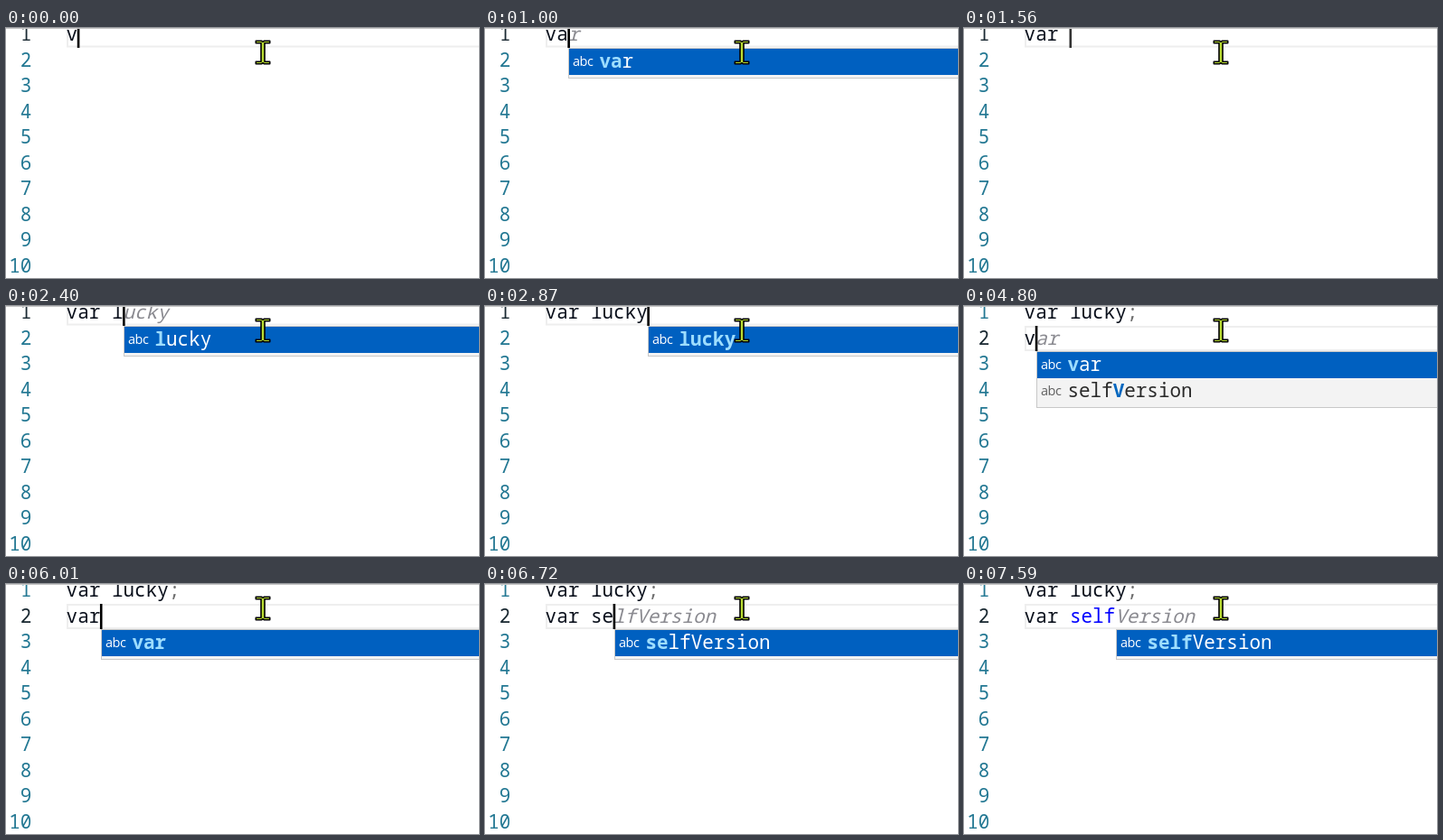
Recreate the animation shown at these times as an HTML page with a canvas. Size 523 by 277 pixels, loop 8 s.

```html
<!DOCTYPE html>
<html lang="en">
<head>
<meta charset="utf-8">
<title>Editor word completion</title>
<style>
html, body { margin: 0; width: 100%; height: 100%; overflow: hidden; background: #fff; }
canvas { display: block; width: 523px; height: 277px; }
</style>
</head>
<body>
<canvas id="stage"></canvas>
<script>
const W = 523, H = 277, LOOP = 8000;
const PITCH = 12.57, LINE = 28.5, LEFT = 66.6, BASE = 14.2;
const BOX = 28, ITEM = 29;
const MONO = '20.95px "Noto Sans Mono", "DejaVu Sans Mono", monospace';
const ICON = '500 14.5px "Open Sans", "Noto Sans", sans-serif';
const INK = '#0a101c';

const canvas = document.getElementById('stage');
const ctx = canvas.getContext('2d');
const ratio = window.devicePixelRatio || 1;
canvas.width = W * ratio;
canvas.height = H * ratio;

// Each step changes only the listed parts of the state.
const steps = [
  { t: 0, row: 0, text: 'v', items: [], caret: '#000', hand: false },
  { t: 70, items: ['var', 'selfVersion'] },
  { t: 470, caret: null },
  { t: 1000, text: 'va', items: ['var'], caret: '#000' },
  { t: 1100, text: 'var' },
  { t: 1560, text: 'var ', items: [], caret: '#333' },
  { t: 2020, caret: null },
  { t: 2330, text: 'var l', caret: '#000' },
  { t: 2400, items: ['lucky'] },
  { t: 2460, text: 'var lu' },
  { t: 2670, text: 'var luc' },
  { t: 2770, text: 'var luck' },
  { t: 2870, text: 'var lucky' },
  { t: 3080, hand: true },
  { t: 3390, caret: null },
  { t: 3670, text: 'var lucky;', items: [], caret: '#5f5a3c' },
  { t: 4140, caret: null, hand: false },
  { t: 4330, row: 1, text: '', caret: '#000' },
  { t: 4800, text: 'v', items: ['var', 'selfVersion'] },
  { t: 4870, text: 'va', items: ['var'] },
  { t: 5020, text: 'var' },
  { t: 5480, caret: null },
  { t: 6010, caret: '#000' },
  { t: 6410, text: 'var ', items: [] },
  { t: 6720, text: 'var se', items: ['selfVersion'] },
  { t: 6940, text: 'var sel' },
  { t: 7130, text: 'var self' },
  { t: 7590, caret: null }
];

function stateAt(t) {
  return Object.assign({}, ...steps.filter(s => s.t <= t));
}

const column = n => LEFT + n * PITCH;
const baseline = row => Math.round(BASE + row * LINE);

function rect(x, y, w, h, color) {
  ctx.fillStyle = color;
  ctx.fillRect(x, y, w, h);
}

function write(str, x, y, color, style = '') {
  ctx.font = style + ' ' + MONO;
  ctx.fillStyle = color;
  ctx.fillText(str, x, y);
}

function drawCode(text, row) {
  for (const part of text.matchAll(/\w+|;/g)) {
    const color = part[0] === 'self' ? '#0000ff' : part[0] === ';' ? '#6e6e6e' : INK;
    write(part[0], column(part.index), baseline(row), color);
  }
}

function drawNumbers(active) {
  for (let i = 0; i < 10; i++) {
    const label = String(i + 1);
    write(label, 28.4 - label.length * PITCH, baseline(i),
      i === active ? '#1b2a33' : '#237893');
  }
}

function drawItem(word, typed, x, y, selected) {
  if (selected) rect(x + 1, y, W - x, ITEM, '#0060c0');
  ctx.font = ICON;
  ctx.letterSpacing = '-0.5px';
  ctx.fillStyle = selected ? '#fff' : '#616161';
  ctx.fillText('abc', x + 5, y + 19);
  ctx.letterSpacing = '0px';

  const from = word.toLowerCase().indexOf(typed);
  const to = from + typed.length;
  const put = (a, b, color, style) =>
    write(word.slice(a, b), x + 34.4 + a * PITCH, y + 21, color, style);
  const plain = selected ? '#fff' : '#2b2b2b';
  put(0, from, plain);
  put(from, to, selected ? '#9dddff' : '#0066bf', 'bold');
  put(to, word.length, plain);
}

function drawPopup({ items, row, text }) {
  const typed = text.split(' ').pop();
  const x = Math.ceil(column(text.length));
  const y = 22 + row * BOX;
  const h = items.length * ITEM + 5;
  write(items[0].slice(typed.length), column(text.length), baseline(row), '#8a8a90', 'italic');
  rect(x, y, W - x, h, '#c8c8c8');
  rect(x + 1, y + 1, W - x, h - 2, '#f3f3f3');
  items.forEach((word, i) => drawItem(word, typed, x, y + 1 + i * ITEM, i === 0));
}

function paint(path, fill, width) {
  ctx.fillStyle = fill;
  ctx.fill(path);
  ctx.strokeStyle = '#000';
  ctx.lineWidth = width;
  ctx.lineJoin = 'round';
  ctx.stroke(path);
}

const beam = new Path2D('M276.3 14.3H282.5L284 15.2L285.5 14.3H291.7V16.8H286V37.2' +
  'H291.7V39.7H285.5L284 38.8L282.5 39.7H276.3V37.2H282V16.8H276.3Z');
const hand = new Path2D('M280.5 45V30Q280.5 27 283 27Q285.5 27 285.7 30L286 35.5' +
  'Q290 34.5 290.5 37Q294 36 294.5 38.5Q298 38 298 41V48Q297.5 53 294.5 56.5' +
  'Q291 58.6 286 58Q282.5 56.5 280 52L274.5 45.5Q273.5 43 276 42.3Q278.5 42 280.5 45Z' +
  'M286 35.5V41.5M290.5 37V42M294.5 38.5V42.5');

function draw(t) {
  const s = stateAt(t);
  ctx.setTransform(ratio, 0, 0, ratio, 0, 0);
  rect(0, 0, W, H, '#fff');

  ctx.strokeStyle = '#eeeeee';
  ctx.lineWidth = 2;
  ctx.lineJoin = 'miter';
  ctx.strokeRect(68, -5.5 + s.row * LINE, W, 26);

  drawNumbers(s.row);
  if (s.row === 1) drawCode('var lucky;', 0);
  drawCode(s.text, s.row);
  if (s.items.length) drawPopup(s);
  if (s.caret) {
    rect(column(s.text.length) - 0.4, -6 + s.row * BOX, 2.6, BOX, s.caret);
  }
  rect(0, 0, W, 1, '#c6c6c6');
  if (s.hand) paint(hand, '#c0ff00', 1.5);
  else paint(beam, '#b9dc32', 1.6);
}

function tick(now) {
  draw(now % LOOP);
  requestAnimationFrame(tick);
}
draw(0);
requestAnimationFrame(tick);
</script>
</body>
</html>
```
